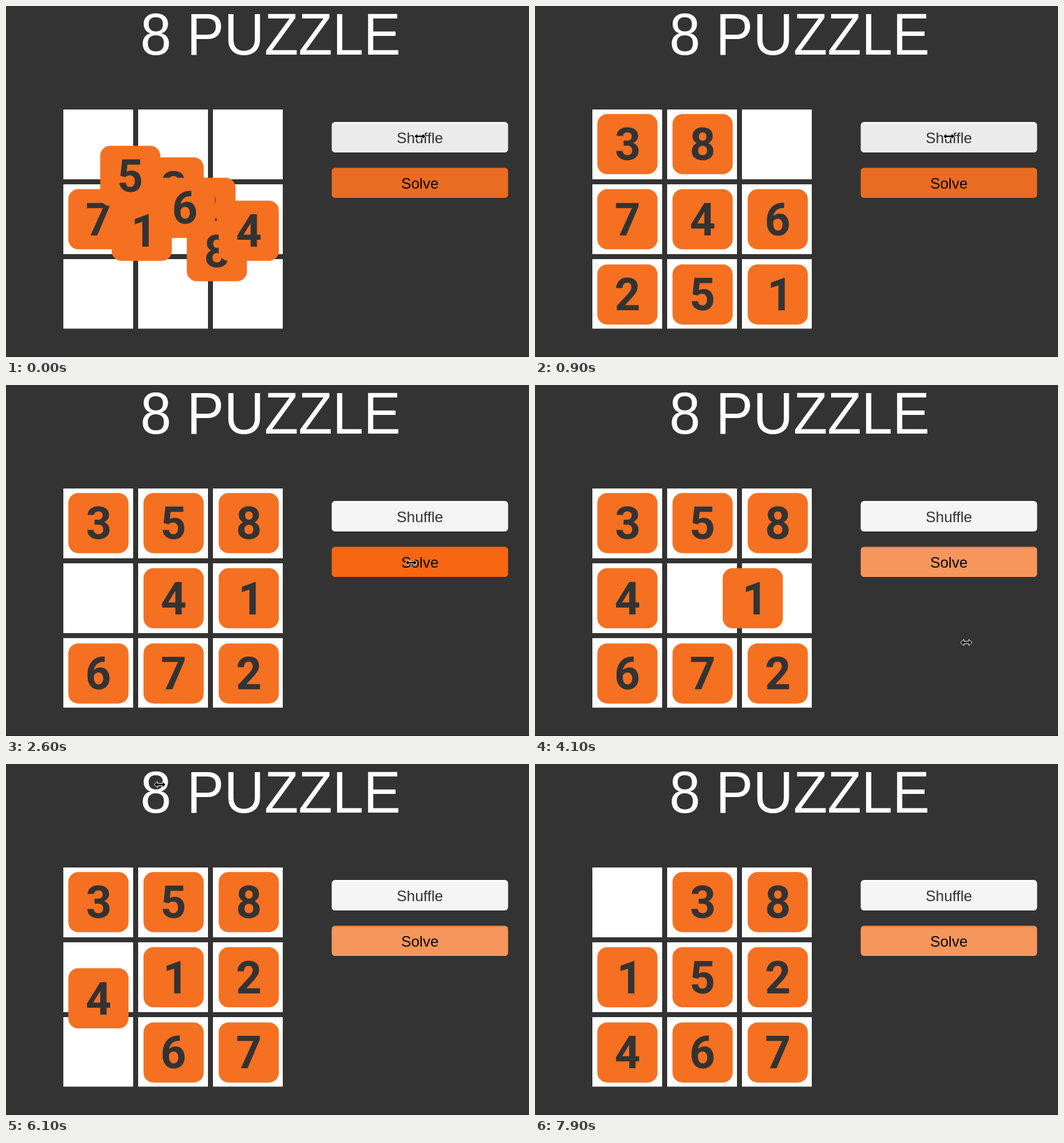
These frames come from a looping animation (839x563 px, 8 s). An HTML page:

```html
<!DOCTYPE html>
<html lang="en">
<head>
<meta charset="utf-8">
<title>8 Puzzle</title>
<style>
  html, body { margin: 0; width: 100%; height: 100%; overflow: hidden; background: #333; }
  svg { display: block; width: 839px; height: 563px; }
  text { text-anchor: middle; font-family: "Liberation Sans", Arial, sans-serif; font-variant-ligatures: none; }
  .title { font-size: 89.5px; fill: #fff; }
  .label { font-size: 24px; }
  .digit { font: 700 72px Roboto, sans-serif; fill: #333; text-anchor: start; }
</style>
</head>
<body>
<svg id="stage" viewBox="0 0 839 563">
  <rect width="839" height="563" fill="#333"/>
  <rect y="562" width="839" height="1" fill="#2a272a"/>
  <text class="title" transform="translate(424.3 78) scale(1 1.05)">8 PUZZLE</text>
  <g id="cells" fill="#fff"></g>
  <g id="tiles"></g>
  <g id="shuffle" transform="translate(522.5 186)">
    <rect y="1" width="283" height="49" rx="5.5" fill="#000" opacity=".3"/>
    <rect class="body" width="283" height="49" rx="5.5"/>
    <path d="M4 1.7H279" stroke="#fff" stroke-width="2.4" opacity=".85"/>
    <text class="label" x="141.5" y="34" fill="#323232">Shuffle</text>
  </g>
  <g id="solve" transform="translate(522.5 259.5)">
    <rect y="1" width="283" height="48.5" rx="5.5" fill="#000" opacity=".4"/>
    <rect class="body" width="283" height="48.5" rx="5.5"/>
    <path d="M4 1.2H279" stroke="#e85f10" stroke-width="1.6" opacity=".35"/>
    <text class="label" x="141.5" y="33.5" fill="#0c0500">Solve</text>
  </g>
  <path id="cursor" d="M-9.3 0L-4 -5V-1.8H4V-5L9.3 0L4 5V1.8H-4V5Z" fill="#000" stroke="#fff" stroke-width="1"/>
</svg>
<script>
const LOOP = 8000, TICK = 100, SLIDE = 250;
const PITCH = 120.6, LEFT = 100, TOP = 173.2, SIZE = 96.5;

// start of the slide, board it leads to (row by row)
const boards = [
  [-1000, '526738_14'],
  [-106, '13475_682'],
  [620, '38_746251'],
  [1520, '358_41672'],
  [3514, '3584_1672'],
  [4017, '35841_672'],
  [4520, '35841267_'],
  [5025, '3584126_7'],
  [5528, '358412_67'],
  [6030, '358_12467'],
  [6535, '3581_2467'],
  [7055, '3_8152467'],
  [7560, '_38152467']
];

// time, x, y
const pointer = [
  [0, 664, 209], [1900, 664, 209], [2200, 656, 255], [2400, 650, 285],
  [2900, 650, 285], [3100, 651, 284], [3700, 651, 284], [4000, 690, 382],
  [4100, 692, 413], [4300, 689, 443], [5800, 689, 443], [5900, 600, 360],
  [6000, 425, 190], [6100, 247, 33], [6200, 150, 8], [6400, 87, 5],
  [6500, 83, 2], [6600, 80, -20], [8000, 80, -20]
];

const shuffleTint = [
  [0, '#ebebeb'], [500, '#c8c8c8'], [700, '#ebebeb'],
  [1400, '#c8c8c8'], [1600, '#ebebeb'], [2100, '#f5f5f5']
];
const solveTint = [
  [0, '#ea6c22'], [2300, '#f6965d'], [2600, '#f76711'], [3400, '#f6965d']
];

const $ = id => document.getElementById(id);

function add(parent, tag, attrs) {
  const el = document.createElementNS('http://www.w3.org/2000/svg', tag);
  for (const k in attrs) el.setAttribute(k, attrs[k]);
  return parent.appendChild(el);
}

const lastIndex = (rows, t) => rows.findLastIndex(r => r[0] <= t);
const mix = (a, b, p) => a + (b - a) * p;

for (let i = 0; i < 9; i++) {
  add($('cells'), 'rect', {
    x: 92 + i % 3 * 120, y: 166 + Math.floor(i / 3) * 120,
    width: 112, height: i < 6 ? 112 : 111.5
  });
}

// Digits are centred on their ink, not on their advance width.
const pen = document.createElement('canvas').getContext('2d');
pen.font = '700 72px Roboto, sans-serif';

const tiles = [...'23785164'].map(digit => {
  const el = add($('tiles'), 'g', {});
  add(el, 'rect', { width: SIZE, height: SIZE, rx: 16, fill: '#f67022' });
  const m = pen.measureText(digit);
  const x = SIZE / 2 - (m.actualBoundingBoxRight - m.actualBoundingBoxLeft) / 2;
  add(el, 'text', { class: 'digit', x, y: 74 }).textContent = digit;
  return { digit, el };
});

function moveTiles(t) {
  const i = lastIndex(boards, t);
  const [start, to] = boards[i];
  const from = boards[Math.max(0, i - 1)][1];
  const p = Math.min(1, (t - start) / SLIDE);
  for (const { digit, el } of tiles) {
    const a = from.indexOf(digit), b = to.indexOf(digit);
    const x = LEFT + PITCH * mix(a % 3, b % 3, p);
    const y = TOP + PITCH * mix(Math.floor(a / 3), Math.floor(b / 3), p);
    el.setAttribute('transform', `translate(${x} ${y})`);
  }
}

function movePointer(t) {
  const i = lastIndex(pointer, t);
  const a = pointer[i], b = pointer[i + 1] || a;
  const p = a === b ? 0 : (t - a[0]) / (b[0] - a[0]);
  $('cursor').setAttribute('transform', `translate(${mix(a[1], b[1], p)} ${mix(a[2], b[2], p)})`);
}

function tint(id, rows, t) {
  $(id).querySelector('.body').setAttribute('fill', rows[lastIndex(rows, t)][1]);
}

function draw(t) {
  moveTiles(t);
  movePointer(t);
  tint('shuffle', shuffleTint, t);
  tint('solve', solveTint, t);
}

const begin = performance.now();
function loop() {
  const t = (performance.now() - begin) % LOOP;
  draw(Math.floor(t / TICK) * TICK);
  requestAnimationFrame(loop);
}
loop();
</script>
</body>
</html>
```
